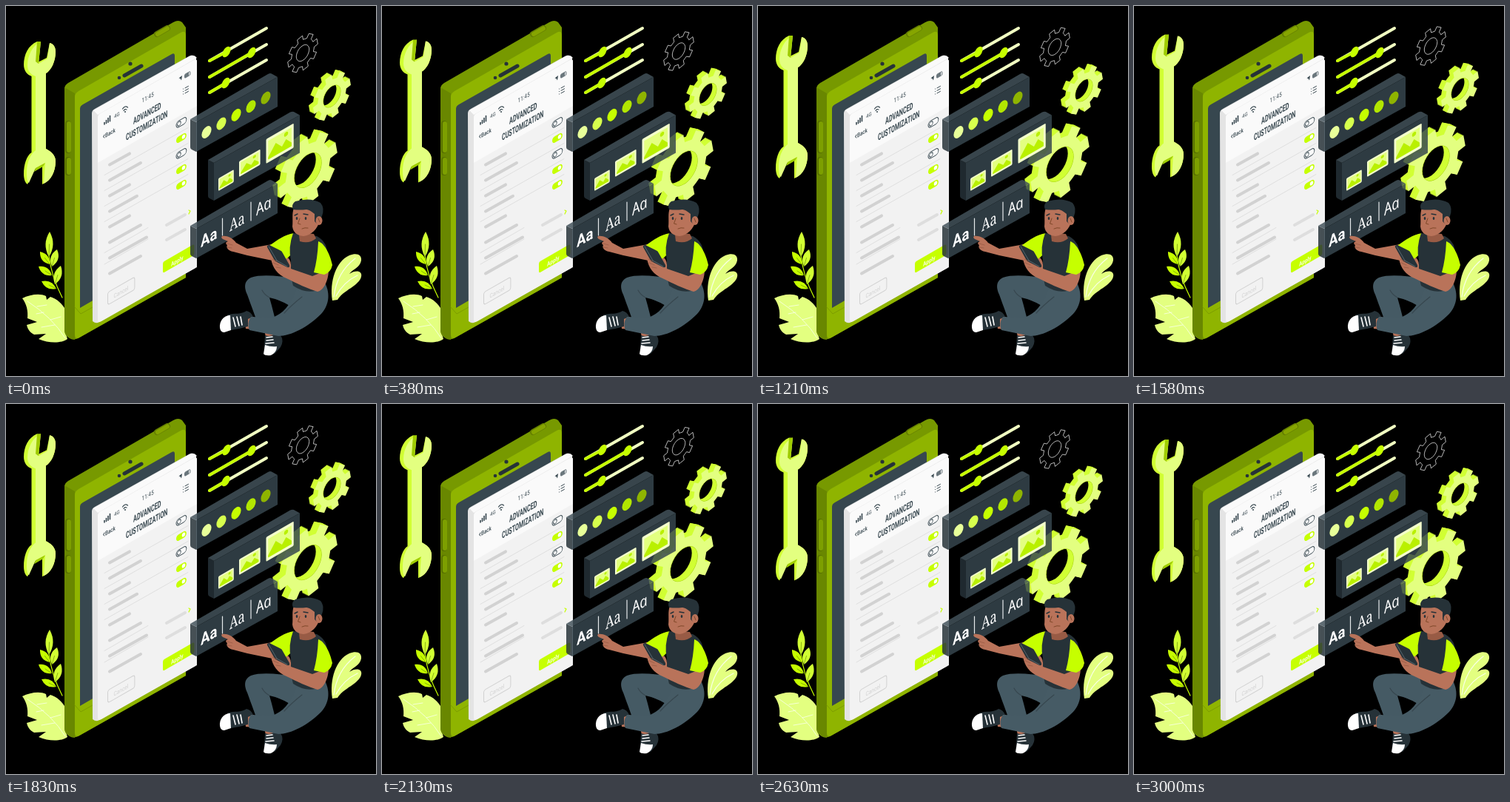
These frames come from a looping animation (500 px wide and 500 px high, 3.04 s). An HTML page:

```html
<!DOCTYPE html>
<html lang="en">
<head>
<meta charset="utf-8">
<title>Advanced customization</title>
<style>
html, body { margin: 0; width: 100%; height: 100%; overflow: hidden; background: #000; }
svg { display: block; width: 100vw; height: 100vh; }
text { font-family: Roboto, Arial, sans-serif; }
.serif { font-family: "Noto Serif", serif; }
.round { font-family: "Open Sans", sans-serif; font-style: italic; }
</style>
</head>
<body>
<svg id="stage" viewBox="0 0 500 500"></svg>
<script>
const LIME = '#c6ff00', PALE = '#e3ff80', SHADE = '#d1ff33', DEEP = '#9fcc00';
const INK = '#263238', SLATE = '#37474f', SKIN = '#b9735a', SKIN_DARK = '#985b45';

const path = (d, fill, extra = '') => `<path d="${d}" fill="${fill}" ${extra}/>`;
const line = (d, color, width = 1, extra = '') =>
  `<path d="${d}" fill="none" stroke="${color}" stroke-width="${width}" stroke-linecap="round" stroke-linejoin="round" ${extra}/>`;
const at = (x, y, body, sx = .866) =>
  `<g transform="matrix(${sx} ${-sx * .575} 0 1 ${x} ${y})">${body}</g>`;
const label = (x, y, size, text, fill, extra = '', sx) =>
  at(x, y, `<text font-size="${size}" fill="${fill}" ${extra}>${text}</text>`, sx);
const rect = (w, h, r, extra) => `<rect width="${w}" height="${h}" rx="${r}" ${extra}/>`;
const disc = (x, y, r, fill) => at(x, y, `<circle r="${r}" fill="${fill}"/>`);

// Gear outline seen on the isometric plane, eight teeth
function gearPath(cx, cy, r, hole) {
  const point = (deg, rad) => {
    const a = deg * Math.PI / 180;
    return `${(cx + .866 * rad * Math.cos(a)).toFixed(1)} ${(cy + rad * (Math.sin(a) - .5 * Math.cos(a))).toFixed(1)}`;
  };
  const outer = [], inner = [];
  for (let a = -11; a < 349; a += 45)
    for (const [da, k] of [[-13, .76], [-10, 1], [10, 1], [13, .76], [22, .75]]) outer.push(point(a + da, r * k));
  for (let a = 0; a < 360; a += 12) inner.push(point(a, hole));
  return `M${outer.join('L')}ZM${inner.join('L')}Z`;
}

function gear(cx, cy, r, depth) {
  const layer = (k, color) => path(gearPath(cx - k, cy - k / 2, r, r * .47), color, 'fill-rule="evenodd"');
  let s = '';
  for (let k = depth; k > 0; k--) s += layer(k, SHADE);
  return s + line(gearPath(cx, cy, r, r * .47).split('Z')[1] + 'Z', DEEP, 1) + layer(0, PALE);
}

function wrench() {
  return path('M42 48C30 53 24 66 24 79C24 88 29 93 34.500 95V198C28 202 24 214 24 227C24 234 26 239 29 241L38 221L49 215L49 241C61 236 67 223 67 210C67 201 60 196 54 193V91C61 87 67 75 67 62C67 55 64 51 59 50L55 70L43 76Z', SHADE) +
    path('M47 48C35 54 29 68 29 80C29 88 34 93 40 95V195C33 200 28 212 28 225C28 233 29 238 31 239L40 219L53 212L51 240C61 236 67 223 67 210C67 201 60 196 54 193V91C61 87 67 75 67 62C67 55 64 51 59 50L56 71L44 78Z', PALE) +
    path('M42 48L47 48L44 78L40 75ZM40 219L53 212L50 217L38 224Z', DEEP);
}

function phone() {
  return path('M79 112Q79 107 84 104L226 22Q233 18 238 22L243 29V367L101 447Q92 453 86 449Q79 445 79 438Z', '#779900') +
    path('M79 110L93 118V451Q79 448 79 438Z', '#698700') +
    path('M93 123Q93 118 98 115L236 36Q243 32 243 40V367L101 447Q93 452 93 444Z', '#8fb400') +
    path('M100 139Q100 135 104 133L224 65Q228 63 228 67V334L100 408Z', SLATE) +
    line('M93 407L101 416L126 402', '#7d9d00') +
    line('M204 38L218 30', '#657f00', 8) + line('M205 38L218 30.500', '#86a500', 6) +
    line('M84 159V195M84 208V225', '#587100', 8) + line('M85 159V195M85 208V225', '#7d9f00', 6) +
    line('M160 94L183 81', INK, 5) + `<circle cx="168" cy="78" r="2.600" fill="${INK}"/><circle cx="153" cy="97" r="2.300" fill="${INK}"/>`;
}

function toggle(x, y, on) {
  return at(x - 7, y - 1, rect(16, 8.500, 4.250, on ? `fill="${LIME}"` : `fill="#fafafa" stroke="${SLATE}"`) +
    `<circle cx="${on ? 11.500 : 4.500}" cy="4.250" r="2.700" fill="#fff" ${on ? '' : `stroke="${SLATE}"`}/>`);
}

function paper() {
  let s = path('M116 145Q116 141 120 139L247 68Q252 65 257 69L258 353L126 427Q122 430 117 426Z', '#e4e4e4') +
    path('M118 141L250 67Q254 66 258 70L124 147Z', '#fafafa') +
    path('M124 151Q124 147 128 145L254 73Q258 71 258 75V349Q258 353 254 355L129 426Q124 429 124 424Z', '#f2f2f2') +
    path('M124 151Q124 147 128 145L254 73Q258 71 258 75V135L124 212Z', '#fafafa');
  s += [0, 1, 2, 3].map(i => line(`M${133 + i * 2.500} ${160 - i * 1.400}V${157.500 - i * 3}`, SLATE, 1.600)).join('') +
    label(146, 152, 7, '4G', SLATE) + label(183.500, 131, 8.500, '11:45', SLATE, 'letter-spacing=".3"', .72) +
    line('M157.500 139Q161 134 164.500 137M159 141.500Q161 138.500 163 140', SLATE, 1.200) +
    `<circle cx="161" cy="143" r="1" fill="${SLATE}"/>` +
    path('M233.500 97.500L238 94L237 100.500L235.500 98Z', SLATE) +
    at(241.500, 92.500, rect(8.500, 5, 1.200, `fill="none" stroke="${SLATE}" stroke-width=".7"`) + rect(6.500, 5, 1, 'fill="#6b777d"'));
  for (let i = 0; i < 3; i++) s += line(`M239.500 ${112 + i * 3.500}h.1M242 ${110.800 + i * 3.500}L246.500 ${108.300 + i * 3.500}`, SLATE, 1);
  s += line('M133 174L131.500 177L133 178', SLATE, 1) + label(134, 178, 8, 'Back', SLATE, 'font-weight="500"', .78) +
    label(172, 160, 12.500, 'ADVANCED', SLATE, 'font-weight="700"', .58) +
    label(162, 182, 12.500, 'CUSTOMIZATION', SLATE, 'font-weight="700"', .57);
  // list rows
  [27, 42, 27, 37, 27, 42, 50, 42].forEach((w, i) => {
    const y = 214.500 + i * 21;
    s += line(`M140 ${y}L${140 + w} ${y - w * .56}`, '#d2d2d2', 4);
    if (i < 4 || i == 5) s += line(`M133 ${y + 14}L${i == 5 ? 192 : 246} ${y + 14 - (i == 5 ? 34 : 64)}`, '#dadada', .8);
    if (i < 5) s += toggle(237, 158 + i * 21, i % 2 || i == 4);
  });
  s += line('M217 296L242 282M217 316L242 302', '#dedede', 4) + line('M247 276L249 277L247 281', LIME, 1.200) +
    line('M133 349L192 315', '#dadada', .8);
  return s + at(212, 346, rect(49, 15, 2.500, `fill="${LIME}"`)) + label(223, 352, 8, 'Apply', '#f8ffe0', 'font-weight="700"', .82) +
    at(137.500, 387, rect(42, 17, 3, 'fill="none" stroke="#d2d2d2" stroke-width="1.2"')) + label(145.500, 395, 8, 'Cancel', '#d2d2d2', '', .82);
}

function slab(x, y, w, h) {
  const rise = w * .555;
  return `<g opacity=".84">` +
    path(`M${x} ${y}l8 4v${h}l-6 -3q-2 -1 -2 -3z`, INK) +
    path(`M${x} ${y}L${x + w - 5} ${y - rise}q3 -1.500 5 -.500l8 4.500L${x + 8} ${y + 4}z`, '#43535b') +
    path(`M${x + 8} ${y + 4}l${w} ${-rise}v${h}l${-w} ${rise}z`, SLATE) + '</g>';
}

function thumb(x, y, w, h) {
  return at(x, y, rect(w, h, 1.500, 'fill="#f4ffcc"') +
    `<g transform="scale(${w / 40} ${h / 34})">` +
    path('M3 4H37V30H3Z', PALE) +
    path('M3 27L14 13L23 23L29 16L37 25V30H3Z', '#b9f000') +
    '<circle cx="29" cy="9" r="3" fill="#b9f000"/></g>');
}

function sliders() {
  return [[73, 298, 62], [95, 332, 63], [116, 297, 104]].map(([y, kx, ky]) =>
    line(`M275 ${y + 1}L352 ${y - 43}`, '#f1ffc2', 4) +
    line(`M275 ${y + 1}L${kx} ${ky}`, LIME, 4) + disc(kx, ky, 6.500, LIME)).join('');
}

function panels() {
  let s = slab(249, 153, 110, 40);
  ['#e8ff99', '#d7ff4d', LIME, '#b2e600', '#8fb400'].forEach((c, i) => s += disc(271 + i * 20, 170.500 - i * 11.600, 7.600, c));
  s += slab(273, 208, 116, 51) + thumb(287, 233, 24, 17) + thumb(315, 210, 33, 21) + thumb(351.500, 180, 43, 33);
  return s + slab(249, 297, 110, 40) +
    line('M292.500 287V310M331 265V290', '#e5e9eb', 1.200) +
    label(263, 326.500, 22, 'Aa', '#fff', 'font-weight="700"', .84) +
    label(302, 305, 22, 'Aa', '#fff', 'class="serif"', .74) +
    label(339, 283, 22, 'Aa', '#fff', 'class="round" transform="skewX(12)"', .84);
}

const leaf = (x, y, tx, ty, w, color) => {
  const a = Math.atan2(ty - y, tx - x), mx = (x + tx) / 2, my = (y + ty) / 2;
  const dx = Math.sin(a) * w, dy = Math.cos(a) * w;
  return path(`M${x} ${y}Q${mx + dx} ${my - dy} ${tx} ${ty}Q${mx - dx} ${my + dy} ${x} ${y}Z`, color) +
    line(`M${x} ${y}L${mx} ${my}`, '#5d7b00', .6);
};

function plants() {
  const twigs = [[58, 339, 59, 305, 10], [62, 352, 69, 329, 10], [66, 376, 74, 351, 10], [59, 349, 46, 332, 9], [62, 364, 44, 352, 9], [68, 382, 48, 372, 9]];
  return line('M58 337Q61 365 76 394', LIME, 1.200) +
    twigs.map(([x, y, tx, ty, w], i) => leaf(x, y, tx, ty, w, i < 3 ? SHADE : LIME)).join('') +
    path('M22 395C32 390 46 388 54 392L55 397L60 393C69 396 76 402 80 410V440L83 450C75 456 58 456 44 450L54 443L38 444C32 441 29 436 28 431L42 427L29 422C30 412 28 403 22 395Z', PALE) +
    line('M29 399Q63 421 80 449M42 406L55 404M51 414L41 416M60 424L74 420M66 431L48 434', '#f6ffd6', 1) +
    path('M441 398C437 372 446 345 464 337C474 333 481 336 480 344C478 354 468 356 464 362C473 356 482 358 480 366C477 378 456 384 448 397Z', PALE) +
    line('M443 393Q447 360 472 341M446 392Q456 373 475 364', '#f9ffe5', 1.200);
}

function man() {
  const shoes =
    path('M322 421L335 420L334 437L324 436Z', SKIN) + path('M349 438L366 438L363 448L351 447Z', SKIN) +
    path('M300 417C309 415 318 417 325 412Q331 413 334 420L327 423V433Q317 436 304 438Z', INK) +
    path('M303 418C294 418 288 426 289 435Q290 441 295 441L304 438Z', '#fff') +
    line('M307 421L310 433M312 420L315 432M317 420L319 431', '#fff', 1.600) +
    path('M350 445Q357 448 363 443L371 445Q376 452 371 461L363 470L349 462Z', INK) +
    line('M352 448L360 447M352 452L361 451M351 456L362 455', '#fff', 1.600) +
    path('M350 458Q358 461 366 460Q366 468 358 472Q350 473 348 470Z', '#fff');
  const legs =
    path('M392 368C370 365 345 362 331 367C321 372 322 381 326 390C331 404 339 425 344 441L368 441C364 424 360 408 356 394C366 396 378 401 388 408L404 390Z', '#455a64') +
    path('M431 374C439 390 436 405 426 416C408 434 385 446 368 446L329 438Q325 429 331 420L360 421C374 416 384 405 392 384Z', '#465b65') +
    line('M400 393Q386 404 376 415M356 394Q349 390 346 384', SLATE, 1.200);
  const farArm =
    path('M365 321L326 328L311 320C306 313 298 310 292 311Q290 313 293 315L300 318C296 319 297 322 299 323C297 326 300 331 307 332L326 337L360 344L382 337Z', SKIN) +
    line('M299 321L306 323M299 326L305 327', SKIN_DARK, .8) +
    path('M389 307C376 309 366 317 357 323Q361 338 376 345L388 333Z', LIME);
  const torso =
    path('M388 307L420 311Q435 319 434 337L432 371L427 382Q407 391 388 378Q383 360 385 344Q381 326 388 307Z', INK) +
    path('M396 306L416 308L419 314Q410 322 397 318Q396 312 396 306Z', SKIN_DARK);
  const head =
    path('M389 273C386 281 388 288 387 298C388 306 393 310 402 311C413 310 421 301 424 290L423 274Q404 265 389 273Z', SKIN) +
    path('M388 275Q385 268 391 264Q411 258 425 266Q431 273 427 284L421 295L417 291V281Q410 275 406 275Q397 276 388 275Z', INK) +
    `<ellipse cx="423" cy="290" rx="4.500" ry="6" fill="${SKIN}"/>` +
    line('M390 283L394 281M402 281L408 282', INK, 1.400) +
    `<ellipse cx="393" cy="287" rx="1.300" ry="2" fill="${INK}"/><ellipse cx="405" cy="287" rx="1.300" ry="2" fill="${INK}"/>` +
    line('M397 287L394.500 294L398 295M400 301Q404 299 408 300M422 287L424 292', '#804829', 1);
  const nearArm =
    path('M436 356C436 370 430 384 421 386C410 383 391 374 379 368C367 363 360 354 358 341L364 337L372 346L381 340Q386 345 385 355L414 365Z', SKIN) +
    path('M422 318C431 321 438 336 441 350Q439 360 430 363L416 360Q421 342 422 318Z', LIME) +
    path('M353 326Q352 323 356 323L370 330Q373 331 374 334L383 350Q384 354 380 353L366 346Q363 345 362 342Z', INK) +
    line('M355 325L366 344L380 352', '#56666e', 1) +
    line('M360 342L366 345M361 347L368 350M365 353L371 354', SKIN_DARK, .8);
  return shoes + legs + farArm + torso + head + nearArm;
}

const stage = document.getElementById('stage');
stage.innerHTML = `<g id="floating">${wrench()}${gear(440.500, 122, 29.500, 6)}${gear(408, 222, 46, 8)}` +
  line(gearPath(401, 63.500, 23.500, 10), '#e5e5e5', .8) + '</g>' +
  plants() + phone() + paper() + sliders() + panels() + man();

// A three second float at 24 steps per second, then one step of rest
const floating = document.getElementById('floating');
const LOOP = 3040, FLOAT = 3000, STEP = 1000 / 24, LIFT = 10;

function frame() {
  const time = performance.now() % LOOP;
  const p = Math.min(1, Math.floor((time + 5) / STEP) * STEP / FLOAT);
  const lift = LIFT * (1 - Math.abs(1 - 2 * p));
  floating.setAttribute('transform', `translate(0 ${-lift})`);
  requestAnimationFrame(frame);
}
frame();
</script>
</body>
</html>
```
